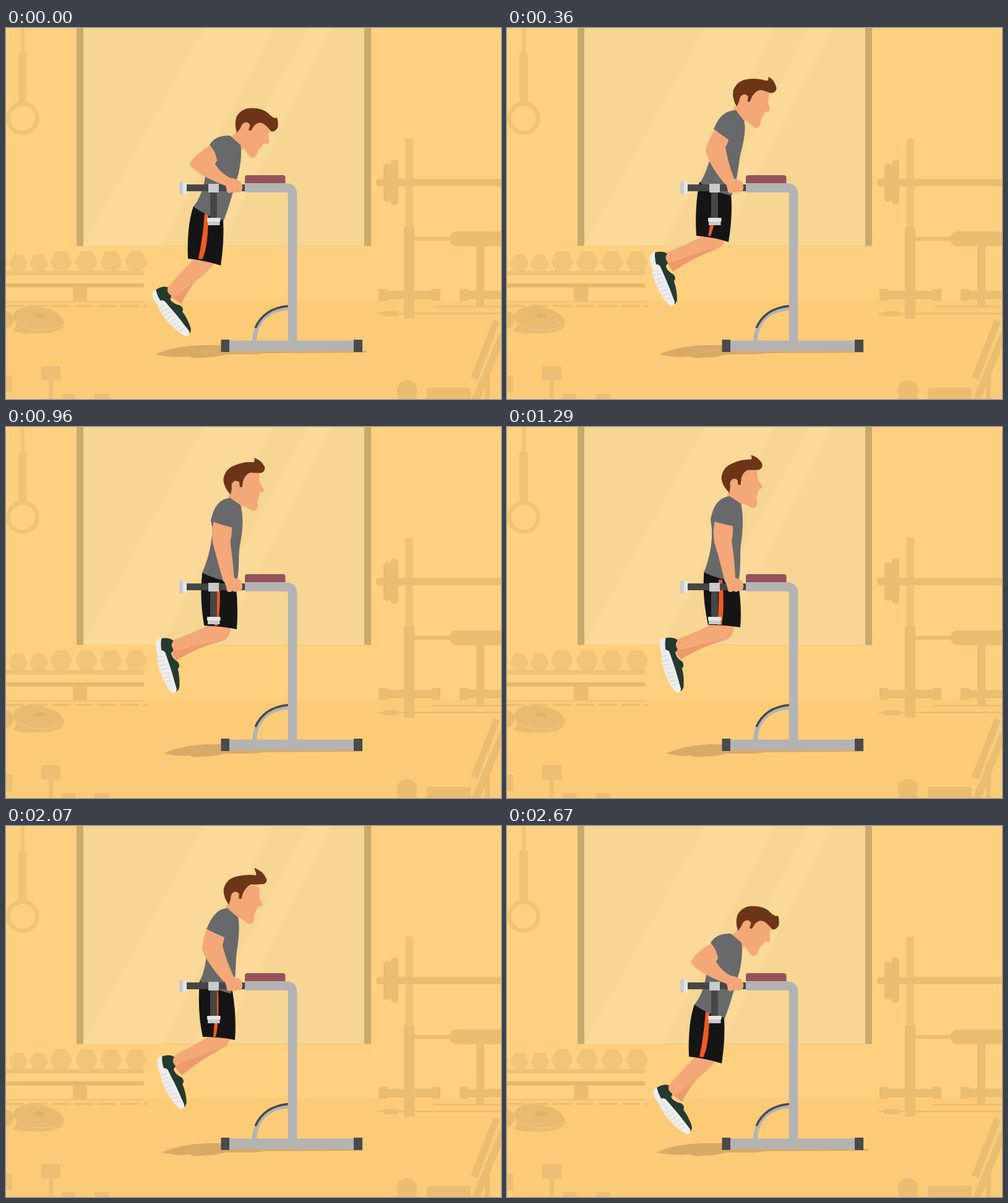
An HTML page that plays this animation: 800x600 px, repeating every 2.73 s.

```html
<!DOCTYPE html>
<html lang="en">
<head>
<meta charset="utf-8">
<title>Dip exercise</title>
<style>
  html, body { margin: 0; width: 100%; height: 100%; overflow: hidden; background: #fed07f; }
  svg { display: block; width: 100vw; height: 100vh; }
  .skin { fill: #f4a777; }
  .hair { fill: #6d3517; }
  .line { fill: none; }
</style>
</head>
<body>
<svg viewBox="0 0 800 600">
  <defs>
    <path id="hex" d="M-18 0L-9 -17H9L18 0L9 17H-9Z"/>
  </defs>
  <rect width="800" height="600" fill="#fed07f"/>
  <rect y="441" width="800" height="159" fill="#fbcb78"/>

  <!-- window -->
  <rect x="114" width="476" height="352.500" fill="#c9aa6d"/>
  <rect x="125" width="454" height="352.500" fill="#f7d592"/>
  <path d="M320 0H432L252 352.500H124.500ZM488 0H526L346 352.500H300Z" fill="#fbd999"/>

  <!-- ring -->
  <g fill="#f0c477">
    <path d="M24 0H30V40H34V122H20V40H24Z"/>
    <circle cx="27" cy="146" r="23.500" class="line" stroke="#f0c477" stroke-width="7"/>
  </g>

  <!-- dumbbell rack and plates -->
  <g fill="#f1c577">
    <use href="#hex" transform="translate(-12 380) scale(.85)"/>
    <use href="#hex" transform="translate(20 381) scale(.85)"/>
    <use href="#hex" transform="translate(53 381) scale(.85)"/>
    <use href="#hex" x="89" y="378"/>
    <use href="#hex" x="130" y="378"/>
    <use href="#hex" x="170" y="378"/>
    <use href="#hex" x="210" y="378"/>
    <rect y="393" width="223" height="7" fill="#efc176"/>
    <rect y="413" width="223" height="6.500" fill="#e3b86e"/>
    <rect x="108" y="419" width="23" height="24" fill="#eabd71"/>
    <rect y="441.500" width="223" height="2" fill="#f1c078"/>
    <path d="M0 449.500H228" class="line" stroke="#ecbd72" stroke-width="3" stroke-dasharray="30 7"/>
  </g>
  <g fill="#e9bb70">
    <ellipse cx="-1" cy="472" rx="13" ry="14"/>
    <path d="M11 468Q14 449 45 450Q88 454 94 476Q94 494 52 494Q11 495 11 487Q22 485 11 468Z"/>
    <path d="M14 474Q30 489 60 488Q84 488 93 478" class="line" stroke="#f0c277" stroke-width="2"/>
    <ellipse cx="54" cy="465" rx="9" ry="4" fill="#dfb265"/>
  </g>
  <path d="M0 562H10V589H0ZM57 547H88V570H76V600H69V570H57ZM90 600V594Q90 592 92 592H110Q112 592 112 594V600ZM143 600V594Q143 592 145 592H165Q167 592 167 594V600Z" fill="#edbf74"/>

  <!-- barbell rack and bench -->
  <g fill="#ebbd71">
    <rect x="645.500" y="179" width="12.500" height="150" fill="#efc276"/>
    <rect x="643" y="322" width="17" height="148"/>
    <rect x="598" y="244" width="220" height="12" rx="5"/>
    <rect x="610" y="219" width="12" height="62" rx="5"/>
    <rect x="622" y="213" width="12" height="73" rx="5"/>
    <rect x="658" y="338" width="64" height="6"/>
    <rect x="717" y="329" width="110" height="24" rx="11"/>
    <rect x="760" y="353" width="13" height="98"/>
    <path d="M602 422H616V425H688V422H702V441H688V439H616V441H602ZM733 422H747V425H800V439H747V441H733Z"/>
    <path d="M690 449.500H800V452H690ZM600 460.500H800V463H600ZM610 458H634V466H610Z"/>
    <circle cx="648" cy="586" r="16.500"/>
    <path d="M633 596H664V600H633Z"/>
    <rect x="680" y="582" width="71" height="30" rx="4"/>
    <path d="M788 471L798 475L762 570L751 565ZM798 492L804 508L766 600H753ZM774 545H782V600H774Z"/>
  </g>

  <path id="shadow" fill="#d9aa66"/>

  <!-- dip station -->
  <g class="line" stroke="#b3b3b4">
    <path d="M401.500 508C401.500 475 424 454 458 453" stroke-width="7"/>
    <path d="M403 485Q417 453 457 449.500" stroke="#494949" stroke-width="3.500"/>
    <path d="M386 258.500H453Q463 258.500 463 268.500V508" stroke-width="14.500"/>
  </g>
  <rect x="358" y="505.500" width="206" height="17" fill="#b3b3b4"/>
  <path d="M347.500 504H361V524H347.500ZM562 504H576V524H562Z" fill="#4a4a4b"/>
  <path d="M386 251V242Q386 238 390 238H447Q451.500 238 451.500 242V251Z" fill="#95525b"/>

  <!-- athlete -->
  <path id="farLeg" fill="#ed9a6c"/>
  <path id="nearLeg" class="skin"/>
  <path id="shorts" fill="#151516"/>
  <path id="stripe" fill="#f15a24"/>
  <g id="shoes">
    <path d="M-20 -3Q-23 2 -18 7Q-10 12 2 12L4 0Q-8 2 -20 -3Z" fill="#ececec"/>
    <path d="M-20 -3Q-19 -11 -14 -17L-10 -20Q-6 -12 4 -15L8 -8L2 4Q-10 3 -20 -3Z" fill="#26392f"/>
    <path d="M2 1L6 -10Q14 -7 25 -15Q33 -17 35 -11Q48 -10 62 -4Q68 -2 69 4Q35 4 2 1Z" fill="#26392f"/>
    <path d="M-2 8Q-3 0 4 -1Q35 -1 66 2Q73 6 68 12Q48 19 22 17Q2 15 -2 8Z" fill="#ededed"/>
    <path d="M8 4L6 13M15 4L13 15M22 4L20 16M29 4L27 16M36 4L34 16M43 5L41 16M50 5L48 15M57 6L55 14" class="line" stroke="#d6d6d6" stroke-width="1.300"/>
  </g>
  <g id="head">
    <path class="skin" d="M-9 9L-13 25L6 42L13 31L26 37Q31 40 34 37Q37 34 37 30Q35 23 36 20L38 14L38 9L45 6Q46 4 44 2L38 -8L36 -23L10 -26Z"/>
    <path id="hair" class="hair"/>
    <path class="skin" d="M5 -7Q-3 -12 -7 -3Q-8 7 -2 10Q4 9 6 1Z"/>
  </g>
  <path id="shirt" fill="#68696a"/>

  <!-- handles -->
  <path d="M291 253H386V264H291ZM330 264H341V309H330Z" fill="#464647"/>
  <path d="M280 248.500H286V269H280ZM327 252H344V266H327ZM326 312.500H345.500V319H326Z" fill="#c9cacb"/>
  <path d="M286 249.500H292V268H286ZM325 307H346.500V313H325Z" fill="#e6e6e7"/>

  <path id="arm" class="skin"/>
  <path class="skin" d="M351 247Q358 241 367 243L379 248Q384 256 381 263Q378 267 374 265Q370 268 366 265Q361 269 357 265Q357 258 351 247Z"/>
  <path d="M366 259V265M374 258V264" class="line" stroke="#e9976a" stroke-width="1"/>
</svg>
<script>
const LOOP = 2730;
const NUM = /-?\d+(\.\d+)?/g;

// k bends the quiff: 1 droops forward, below 0 it lifts.
const hair = k => `M-8 14Q-19 4 -21 -9Q-20 -26 -5 -33Q9 -40 ${24 - 4 * k} ${-40 + 2 * k}` +
  `Q${30 + 5 * k} ${-39 + 6 * k} ${27 + 10 * k} ${-47 + 9 * k}Q${38 + 4 * k} ${-45 + 10 * k} ${45 + k} ${-33 + 8 * k}` +
  `Q46 ${-24 + 8 * k} ${37 + 3 * k} ${-23 + 9 * k}Q30 ${-23 + 5 * k} ${22 + 2 * k} ${-23 + 4 * k}Q14 -20 11 -9L10 1L6 1L4 -7L-6 0Z`;

const shadow = (x, end) => `M${x} 528Q${x + 28} 515 ${x + 72} 513L390 513L420 521L${end} 522L${end} 525L418 526L400 528L356 528L336 532L304 534L296 531Q${x + 30} 534 ${x} 528Z`;

// Five poses per part: bottom, rising, nearly up, top, sinking.
const parts = {
  shadow: [shadow(241, 583), shadow(246, 577), shadow(251, 576), shadow(257, 576), shadow(252, 576)],
  hair: [hair(1), hair(0), hair(0), hair(0), hair(-0.6)],
  head: [
    "translate(387 161) rotate(28)",
    "translate(383 116) rotate(17)",
    "translate(378 102) rotate(8)",
    "translate(367.5 92.5) rotate(0)",
    "translate(370.5 115) rotate(11)"],
  shoes: [
    "translate(253.5 440) rotate(48)",
    "translate(245 382.5) rotate(65)",
    "translate(248.5 364) rotate(70)",
    "translate(260.5 361) rotate(70)",
    "translate(259 391.5) rotate(62)"],
  shirt: [
    "M362 174Q338 173 329 189L341 214L322 240Q318 270 303 289Q325 305 352 311C364 280 368 258 376 235Q382 205 379 189Z",
    "M370 133Q345 133 334 164L357 180L330 205Q322 235 312 250Q335 266 363 271C373 245 374 222 377 205Q388 165 383 150Z",
    "M366 120Q342 121 333 154L340 165L333 185Q328 212 315 238Q340 250 370 256C377 232 374 212 378 195Q388 150 380 131Z",
    "M360 112Q335 114 329 150L331 165L331 180Q329 208 318.5 235Q342 247 374 250C379 230 376 200 378 190Q384 150 378 124Z",
    "M358 133Q337 133 324 167L352 180L324 205Q323 232 313 251Q337 264 363 271C374 246 370 222 373 203Q379 165 375 148Z"],
  arm: [
    "M330 190Q308 202 296.5 219Q304 236 357 256L371 246Q347 238 336 216Q341 217 341 214Q339 200 330 190Z",
    "M336 164Q325 181 321 197Q325 220 352 252L368 246Q357 218 353 193Q357 186 358 181Q346 174 336 164Z",
    "M335 155Q331 170 332 188Q338 222 351 250L369 246Q364 215 361 187Q365 175 364 167Q348 162 335 155Z",
    "M336 153Q332 166 335 186Q345 220 352 250L369 246Q368 215 363 184Q366 172 365 160Q350 158 336 153Z",
    "M325 167Q318 182 317 198Q322 218 352 252L369 246Q355 215 350 193Q352 186 353 180Q338 175 325 167Z"],
  shorts: [
    "M303 288Q292 320 294 373Q322 376 347 384Q353 345 351 309Z",
    "M311 249Q303 290 306 336Q333 338 358 346Q365 305 362 268Z",
    "M315 237Q308 282 313 324Q340 326 366 333Q370 290 367 253Z",
    "M318.5 234Q315 275 325 320Q350 320 377 324Q380 290 373 247Z",
    "M313 250Q309 300 318 341Q345 341 370 346Q373 310 366 267Z"],
  stripe: [
    "M321 300L327 300Q327 355 317 374L311 373Q318 340 321 300Z",
    "M331 268L338 268Q338 315 329 336L325 336Q331 310 331 268Z",
    "M334 260L341 260Q341 300 335 325L331 325Q334 300 334 260Z",
    "M342 247L348 247Q352 290 347 320L340 320Q343 290 342 247Z",
    "M337 267L343 267Q345 315 339 341L335 341Q338 310 337 267Z"],
  nearLeg: [
    "M304 374Q285 392 256 426L268 438Q310 410 336 382Q336 380 334 376L320 372Z",
    "M317 336Q290 350 250 367L258 380Q300 365 343 356Q352 350 351 343L335 334Z",
    "M324 324Q295 338 255 351L261 366Q310 354 345 349Q357 343 357 330L340 320Z",
    "M330 319Q305 333 264 347L270 361Q315 350 352 345Q367 340 367 322L345 316Z",
    "M330 339Q300 357 264 376L271 389Q315 370 350 359Q361 356 361 344L345 336Z"],
  farLeg: [
    "M331 382Q300 412 283 446L270 437Q285 415 320 386Z",
    "M340 357Q300 372 268 394L259 380Q285 372 330 354Z",
    "M350 347Q305 358 270 380L261 366Q285 362 330 348Z",
    "M352 345Q315 354 281 376L270 361Q290 358 340 344Z",
    "M350 359Q315 378 284 403L272 389Q290 380 330 360Z"]
};

// [time, pose, second pose, share of the second]
const keys = [
  [0, 0, 0, 0], [360, 1, 1, 0], [660, 2, 2, 0], [1290, 3, 3, 0], [1770, 3, 4, 0.17],
  [2070, 4, 4, 0], [2240, 4, 0, 0.57], [2670, 0, 0, 0], [LOOP, 0, 0, 0]
];
const times = keys.map(k => k[0]);

// Monotone cubic through one value per key, at rest at both ends.
function curve(v) {
  const d = v.slice(1).map((y, i) => (y - v[i]) / (times[i + 1] - times[i]));
  const m = v.map((_, i) => {
    const a = d[i - 1] || 0, b = d[i] || 0;
    return a * b > 0 ? 2 * a * b / (a + b) : 0;
  });
  return (i, u) => {
    const h = times[i + 1] - times[i], w = 1 - u;
    return v[i] * (1 + 2 * u) * w * w + v[i + 1] * u * u * (3 - 2 * u)
      + h * u * w * (m[i] * w - m[i + 1] * u);
  };
}

const rig = Object.entries(parts).map(([id, poses]) => {
  const nums = poses.map(s => s.match(NUM).map(Number));
  return {
    el: document.getElementById(id),
    attr: poses[0].startsWith("t") ? "transform" : "d",
    form: poses[0],
    curves: nums[0].map((_, n) => curve(keys.map(([, a, b, f]) => nums[a][n] * (1 - f) + nums[b][n] * f)))
  };
});

function draw(now) {
  const t = now % LOOP;
  let i = 0;
  while (t >= times[i + 1]) i++;
  const u = (t - times[i]) / (times[i + 1] - times[i]);
  for (const { el, attr, form, curves } of rig) {
    let n = 0;
    el.setAttribute(attr, form.replace(NUM, () => curves[n++](i, u).toFixed(2)));
  }
}

const start = performance.now();
function tick() {
  draw(performance.now() - start);
  requestAnimationFrame(tick);
}
tick();
</script>
</body>
</html>
```
